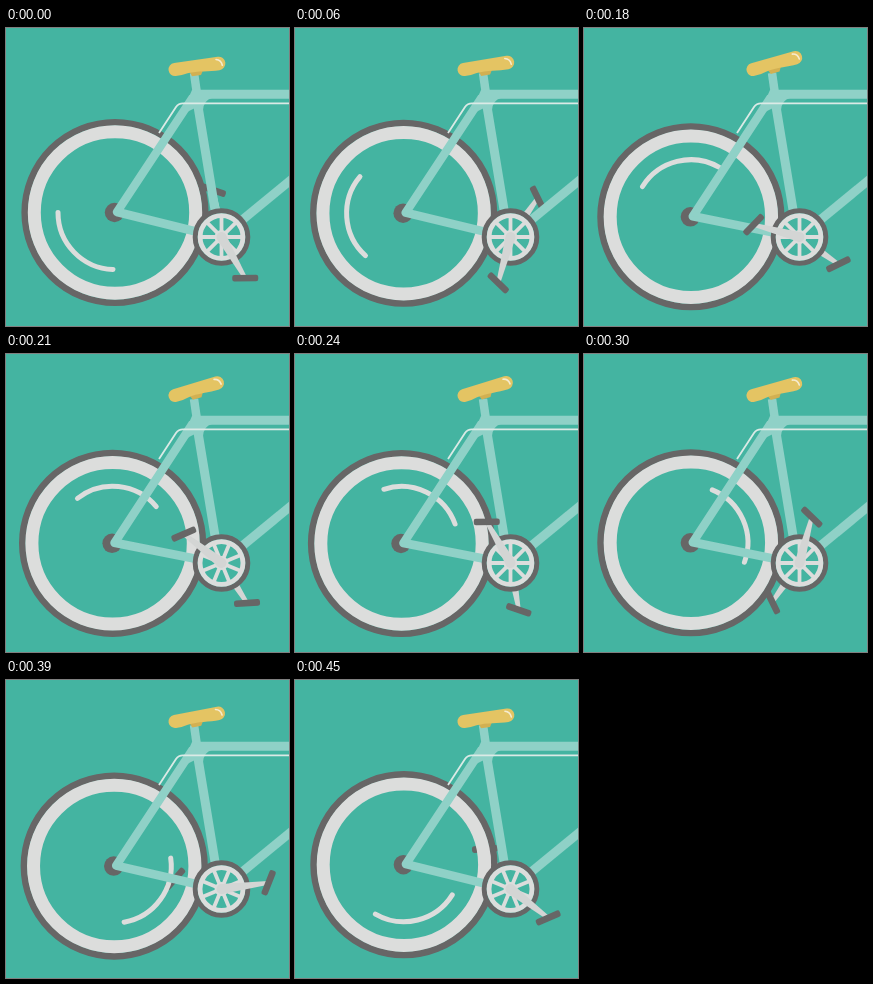
Recreate the animation shown at these times as an HTML page. Size 283 by 298 pixels, loop 480 ms.

```html
<!DOCTYPE html>
<html lang="en">
<head>
<meta charset="utf-8">
<title>Bicycle</title>
<style>
  @property --k { syntax: "<number>"; inherits: true; initial-value: 0; }
  @keyframes ride { to { --k: 1; } }

  html, body { margin: 0; width: 100%; height: 100%; overflow: hidden; background: #44b4a1; }

  svg {
    --turn: calc(var(--k) * 360deg);
    --bob: calc(.5 - .5 * cos(var(--turn)));
    display: block; width: 100%; height: 100%;
    animation: ride 480ms steps(16) infinite;
  }

  .bounce { transform: translate(calc(var(--bob) * -2.5px), calc(var(--bob) * 5px)); }
  .glint  { transform: rotate(calc(var(--k) * 320deg)); }
  .ring   { transform: rotate(var(--turn)); }
  .near   { transform: rotate(calc(60deg + var(--turn))); }
  .far    { transform: rotate(calc(260deg + var(--turn))); }
  .saddle { transform: rotate(calc(-7.6deg - var(--bob) * 9deg)); }

  /* shear that keeps the seat tube still while the rear axle follows the wheel */
  .stays {
    transform-origin: 188px 68px;
    transform: matrix(calc(1 + .025 * var(--bob)), calc(-.05 * var(--bob)),
                      calc(-.0048 * var(--bob)), calc(1 + .0096 * var(--bob)), 0, 0);
  }

  .tube  { fill: none; stroke: #8fd1c7; stroke-linejoin: round; }
  .dark  { fill: #676666; }
  .light { fill: none; stroke: #dcdddc; }
</style>
</head>
<body>
<svg viewBox="0 0 283 298" preserveAspectRatio="none">
  <defs>
    <g id="crank">
      <path d="M0-5 L47-2 V2 L0 5 A5 5 0 0 1 0-5Z" fill="#d3d5d4"/>
      <rect class="dark" x="-13" y="-3.3" width="26" height="6.6" rx="2.2"
            transform="translate(47.5 0) rotate(-61)"/>
    </g>
    <path id="spoke" d="M0-21V21"/>
  </defs>

  <g transform="translate(215.5 209)"><g class="far"><use href="#crank"/></g></g>

  <g class="bounce">
    <g transform="translate(109 184.5)">
      <circle r="90.3" fill="none" stroke="#676666" stroke-width="6.6"/>
      <circle class="light" r="80.7" stroke-width="13"/>
      <path class="glint light" d="M-2 57 A57 57 0 0 1 -57 0" stroke-width="5" stroke-linecap="round"/>
      <circle class="dark" r="9.7" cx="-.5"/>
    </g>
  </g>

  <g class="stays">
    <path class="tube" d="M187 69 L111 184 L200 206" stroke-width="8.5"/>
    <path d="M112 178 L124 186 L110 184Z" fill="#8fd1c7"/>
  </g>

  <path class="tube" d="M188 45 L191 66" stroke-width="8.5"/>
  <path class="tube" d="M283 66.3 H190 L212 200" stroke-width="9"/>
  <path class="tube" d="M215.5 209 L286 151" stroke-width="9"/>
  <path d="M186 62 H202 L206 70 Q198 72 197 82 L189 80 L181 84 L178 80Z" fill="#8fd1c7"/>
  <path d="M153 105 L170 79 Q172.500 75.300 177 75.300 H283" fill="none" stroke="#dbeae6" stroke-width="1.8"/>

  <g transform="translate(169 41.5)">
    <g class="saddle">
      <path d="M14 4 H28 L25 9 H16Z" fill="#d2b052"/>
      <path d="M0-6.500 L44-7 A6.800 6.800 0 0 1 44 6.600 C34 7 22 4 12 5.500 Q6 7 0 6.500 A6.500 6.500 0 0 1 0-6.500Z" fill="#e4c463"/>
      <path d="M42-4.500 Q47-3.500 47.500 2" fill="none" stroke="#f6ecd0" stroke-width="1.6" stroke-linecap="round"/>
    </g>
  </g>

  <g transform="translate(215.5 209)">
    <circle r="26.300" fill="#44b4a1" stroke="#676666" stroke-width="5"/>
    <g class="ring light" stroke-width="3.8">
      <circle r="21.400" stroke-width="4.800"/>
      <use href="#spoke"/>
      <use href="#spoke" transform="rotate(45)"/>
      <use href="#spoke" transform="rotate(90)"/>
      <use href="#spoke" transform="rotate(135)"/>
      <circle r="5" fill="#dcdddc"/>
    </g>
    <g class="near"><use href="#crank"/></g>
  </g>
</svg>
</body>
</html>
```
